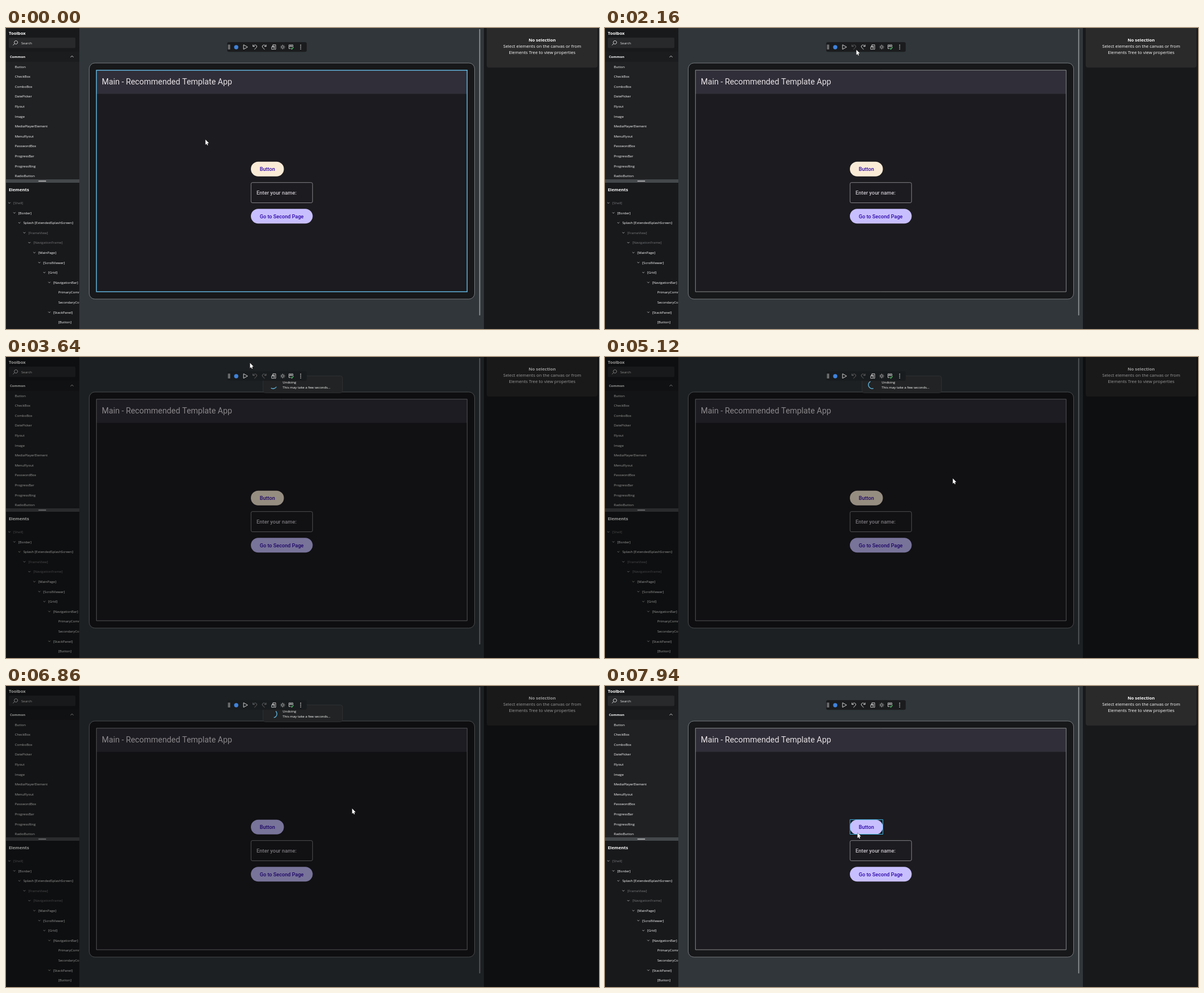
These frames come from a looping animation (1051x533 px, 8000 ms). An HTML page with a canvas:

```html
<!DOCTYPE html>
<html lang="en">
<head>
<meta charset="utf-8">
<title>Visual designer: undo</title>
<style>
html, body { margin: 0; width: 100%; height: 100%; overflow: hidden; background: #18191b; }
canvas { display: block; }
</style>
</head>
<body>
<canvas id="stage" width="1051" height="533"></canvas>
<script>
const ctx = document.getElementById('stage').getContext('2d');
const LOOP = 8000;
const DIM_START = 2200, DIM_END = 6930, UNDONE = 6800, READY = 7010, RING_START = 2160;
const UI = '"Open Sans", sans-serif', APP = 'Roboto, sans-serif';
const BLUE = '#62b4dc';

const TOOLS = ['Button', 'CheckBox', 'ComboBox', 'DatePicker', 'Flyout', 'Image', 'MediaPlayerElement',
  'MenuFlyout', 'PasswordBox', 'ProgressBar', 'ProgressRing', 'RadioButton'];
// depth, label, state: d = dimmed, l = leaf
const TREE = [[0, '[Shell]', 'd'], [1, '[Border]'], [2, 'Splash [ExtendedSplashScreen]'], [3, '[FrameView]', 'd'],
  [4, '[NavigationFrame]', 'd'], [5, '[MainPage]'], [6, '[ScrollViewer]'], [7, '[Grid]'], [8, '[NavigationBar]'],
  [9, 'PrimaryCommands', 'l'], [9, 'SecondaryCommands', 'l'], [8, '[StackPanel]'], [9, '[Button]', 'l']];

// pointer path: time, x, y
const PATH = [[0, 353.5, 197.5], [660, 353.5, 197.5], [680, 354.5, 197.5], [850, 354.5, 197.5], [1670, 446, 42],
  [1740, 446, 42], [1830, 445.5, 38.5], [2650, 445.5, 38.5], [3490, 432.5, 10.5], [3800, 432.5, 10.5],
  [4650, 616.5, 215], [5600, 616.5, 215], [6380, 613.5, 217], [7240, 613.5, 217], [7550, 468.5, 254.5],
  [7650, 468.5, 254.5], [7940, 447.5, 260], [LOOP, 447.5, 260]];

function pointerAt(t) {
  const i = PATH.findIndex(p => p[0] > t);
  const [t0, x0, y0] = PATH[i - 1], [t1, x1, y1] = PATH[i];
  const u = (t - t0) / (t1 - t0), e = u * u * (3 - 2 * u);
  return [x0 + (x1 - x0) * e, y0 + (y1 - y0) * e];
}

function rect(x, y, w, h, fill) {
  ctx.fillStyle = fill;
  ctx.fillRect(x, y, w, h);
}

function box(x, y, w, h, r, fill, stroke, width = 1) {
  ctx.beginPath();
  ctx.roundRect(x, y, w, h, r);
  if (fill) { ctx.fillStyle = fill; ctx.fill(); }
  if (stroke) { ctx.strokeStyle = stroke; ctx.lineWidth = width; ctx.stroke(); }
}

function text(str, x, y, size, { color = '#fff', weight = 400, font = UI, align = 'left' } = {}) {
  ctx.font = `${weight} ${size}px ${font}`;
  ctx.textAlign = align;
  ctx.fillStyle = color;
  ctx.fillText(str, x, y);
}

function stroke(path, x, y, color = '#e8e8e8', width = 0.9) {
  ctx.save();
  ctx.translate(x, y);
  ctx.strokeStyle = color;
  ctx.lineWidth = width;
  ctx.stroke(new Path2D(path));
  ctx.restore();
}

function circle(x, y, r, fill) {
  ctx.beginPath();
  ctx.arc(x, y, r, 0, Math.PI * 2);
  ctx.fillStyle = fill;
  ctx.fill();
}

function drawLeftPanel() {
  ctx.save();
  ctx.beginPath();
  ctx.rect(0, 0, 130, 533);
  ctx.clip();
  rect(0, 0, 130, 533, '#18191b');
  text('Toolbox', 5, 11.6, 7.7, { weight: 700 });
  box(5, 17, 118, 18.5, 2, '#28292b');
  stroke('M1.2 -4A3 3 0 1 1 1.1 -4M-1.1 .9L-4 4', 16.5, 26.5);
  text('Search', 27, 28.8, 6.05, { color: '#e4e4e4' });
  rect(0, 42, 130, 17.5, '#1b1c1e');
  rect(0, 59.5, 130, 209, '#202123');
  text('Common', 7, 52.8, 6.05, { weight: 700 });
  stroke('M-2.5 1.3L0 -1.2L2.5 1.3', 117, 50.5);
  TOOLS.forEach((name, i) => text(name, 15.7, 70.5 + i * 17.6, 6.05));
  rect(0, 268, 130, 6, '#45484b');
  rect(57.5, 270.5, 13.5, 1.2, '#e0e0e0');
  text('Elements', 5, 289.4, 7.75, { weight: 700 });
  TREE.forEach(([depth, name, state], i) => {
    const x = depth * 8.85, y = 309.6 + i * 17.6;
    text(name, 13 + x, y + 2.3, 6.05, { color: state === 'd' ? '#76777a' : '#fff' });
    if (state !== 'l') stroke('M-1.8 -.8L0 1L1.8 -.8', 6 + x, y, '#c8c8c8', 0.8);
  });
  ctx.restore();
}

function drawRightPanel() {
  rect(847, 0, 204, 533, '#18191b');
  box(852, -6, 196.5, 76, 4, '#2a2a2b');
  text('No selection', 950.3, 24.2, 7.75, { weight: 700, align: 'center' });
  text('Select elements on the canvas or from', 950.3, 35.3, 7.75, { align: 'center' });
  text('Elements Tree to view properties', 950.3, 46.3, 7.75, { align: 'center' });
}

function drawApp(t, [px, py]) {
  const tracking = t < RING_START || t >= 7290;
  const onButton = tracking && px > 434 && px < 493 && py > 237 && py < 263;
  const onScreen = tracking && !onButton && px > 160 && px < 817 && py > 75 && py < 467;
  const label = { color: '#2c06a8', weight: 500, font: APP, align: 'center' };

  box(147.5, 62, 683, 418, 10, '#17181a', '#777b7e');
  rect(160, 75, 657, 392, '#1c1b1f');
  rect(160, 75, 657, 41.7, '#302e38');
  box(160.3, 74.7, 657, 392.3, 0, null, onScreen ? BLUE : '#96989a', onScreen ? 1.5 : 0.9);
  text('Main - Recommended Template App', 169.8, 100.3, 14.3, { color: '#e6e1e5', font: APP });

  box(434, 236.7, 58.5, 26, 13, t < UNDONE ? '#faebd7' : '#c8bfff');
  text('Button', 463.2, 253.2, 9.15, label);
  if (onButton) box(434.2, 236.7, 58.3, 25.8, 0, null, '#3fb6e6', 1);
  box(434.3, 273.7, 109, 35.8, 2.5, null, '#918f96', 0.9);
  text('Enter your name:', 444, 295.2, 9.4, { color: '#c9c5cd', weight: 500, font: APP });
  box(434, 320.2, 109.5, 26, 13, '#c8bfff');
  text('Go to Second Page', 488.6, 336.8, 9.15, label);
}

function drawRing(t) {
  const p = (t - RING_START) / 2000 % 1, deg = Math.PI / 180;
  const turn = 900 * p + 88 - 90;
  const tail = Math.max(0, p - 0.5) * 360, head = Math.min(p, 0.5) * 360;
  ctx.beginPath();
  ctx.arc(473.5, 49.3, 6.7, (turn + tail) * deg, (turn + head) * deg);
  ctx.strokeStyle = BLUE;
  ctx.lineWidth = 1.4;
  ctx.stroke();
}

function drawPopup(t) {
  box(455.5, 33.5, 141, 30, 4, '#222324', '#313335', 0.8);
  text('Undoing', 490.3, 46.7, 6.05);
  text('This may take a few seconds...', 490.3, 55.6, 6.05);
  if (t > 2300) drawRing(t);
}

function drawToolbar(t, dimmed) {
  const off = '#6b6d6f', on = '#e8e8e8';
  box(392, 25, 141, 17.3, 3, dimmed ? '#191c1e' : '#1b1c1e');
  stroke('M-1 -4.3V4.3M1.2 -4.3V4.3', 395.2, 33.7, on, 0.8);
  circle(408, 34, 3.7, '#3f83dc');
  stroke('M-3.2 -4L4 0L-3.2 4Z', 424.2, 33.7, on);
  const undo = 'M-3.3 -4.2V-1H0M-3.2 -1.2C-1 -4 1.5 -4.1 2.7 -2.8C4 -1.4 3.5 .2 2.5 1.2L-.7 4.3';
  const redo = 'M3.3 -4.2V-1H0M3.2 -1.2C1 -4 -1.5 -4.1 -2.7 -2.8C-4 -1.4 -3.5 .2 -2.5 1.2L.7 4.3';
  stroke(undo, 441, 33.7, t >= 2080 && t < READY ? off : on);
  stroke(redo, 457.7, 33.7, t >= DIM_START && t < READY ? off : on);
  stroke('M-1.5 -1V-4H3.5V4H1.5M-3.7 0H.7V4H-3.7ZM-2.6 0V-1.8H-.4V0M1.3 -2.3V1', 474.5, 33.7, on, 0.8);
  stroke('M2 0A2 2 0 1 1 -2 0A2 2 0 1 1 2 0M0 -4.2V-3M0 3V4.2M-4.2 0H-3M3 0H4.2' +
    'M-3 -3L-2.2 -2.2M3 3L2.2 2.2M3 -3L2.2 -2.2M-3 3L-2.2 2.2', 490.4, 33.7, on, 0.8);
  stroke('M-3.8 -3.8H3.2V-.7H-3.8ZM-3.8 -.7V2.8H-1M-2.4 -2.2H1.6', 505.3, 33.7, on, 0.8);
  stroke('M-.3 2.2L1.3 3.8L4.4 .2', 505.3, 33.7, '#4fc46a', 1.2);
  [-3.3, 0, 3.3].forEach(dy => circle(522.3, 33.7 + dy, 0.85, on));
}

function drawPointer([x, y]) {
  ctx.save();
  ctx.translate(x, y);
  const arrow = new Path2D('M0 0V9.2L2 7.4L3.3 10.3L4.7 9.7L3.4 6.8L6.2 6.6Z');
  ctx.strokeStyle = '#111';
  ctx.lineWidth = 0.8;
  ctx.stroke(arrow);
  ctx.fillStyle = '#fff';
  ctx.fill(arrow);
  ctx.restore();
}

function draw(now) {
  const t = now % LOOP, pointer = pointerAt(t);
  const dimmed = t >= DIM_START && t < DIM_END;
  rect(0, 0, 1051, 533, '#30363a');
  drawApp(t, pointer);
  box(838.7, 2, 1.7, 507, 0.8, '#92979a');
  drawLeftPanel();
  drawRightPanel();
  if (dimmed) {
    rect(0, 0, 1051, 533, 'rgba(0,0,0,.4)');
    drawPopup(t);
  }
  drawToolbar(t, dimmed);
  drawPointer(pointer);
  requestAnimationFrame(() => draw(performance.now()));
}
draw(0);
</script>
</body>
</html>
```
